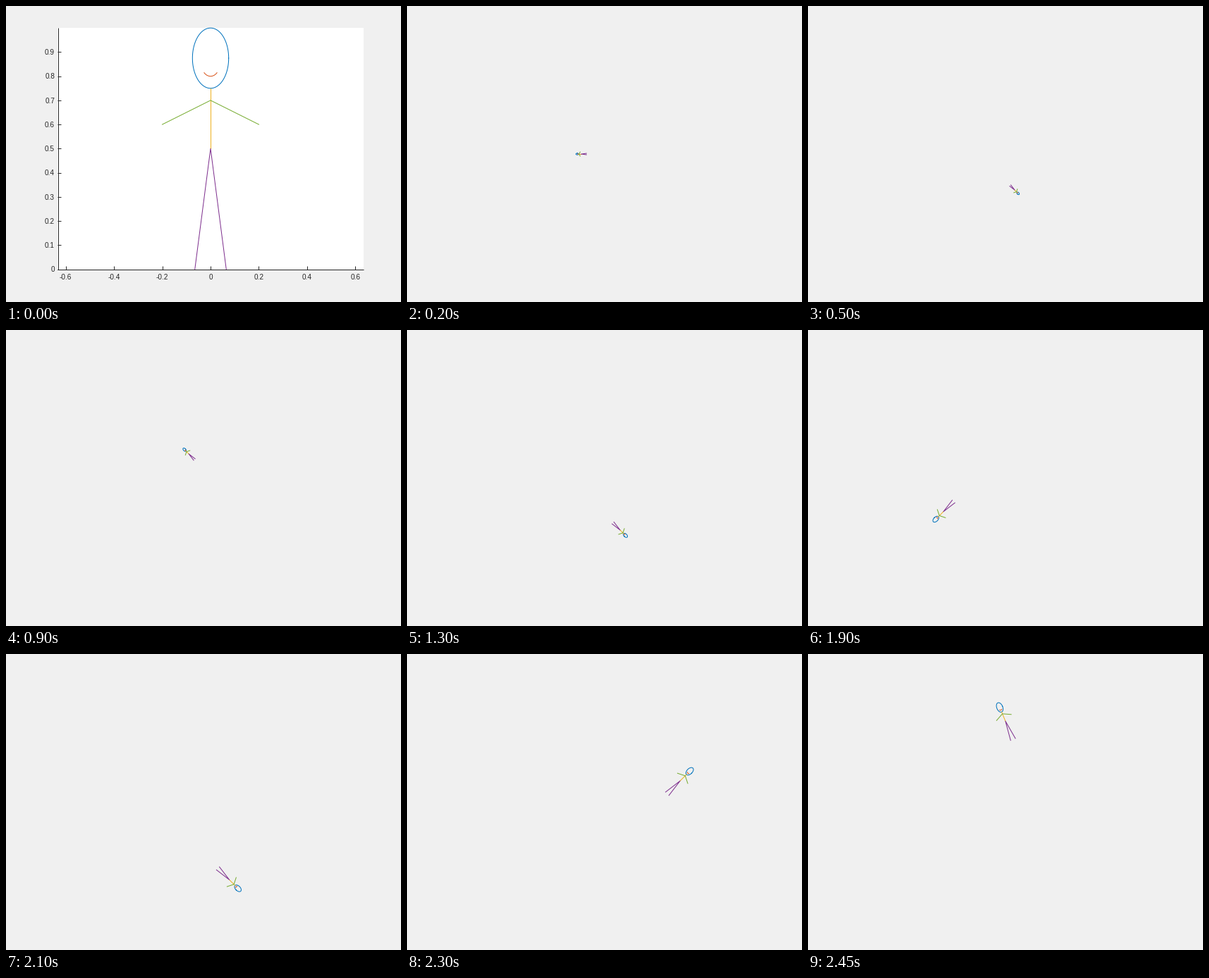
A matplotlib script that plays this animation: 560x420 px, repeating every 2500 ms.

```python
import numpy as np
import matplotlib.pyplot as plt
from matplotlib.animation import FuncAnimation
from matplotlib.patches import Rectangle

W, H, DPI = 560, 420, 100
FRAMES, INTERVAL = 50, 50
PX = 72 / DPI
INK = "#262626"

# Plot box in pixels, y pointing down
LEFT, RIGHT, TOP, BOTTOM = 73, 507, 31, 374
BIG, BIG_ORIGIN = 342.3, (290, 373.5)
SMALL, SMALL_ORIGIN = 13.2, (290, 202.4)

# Each step shifts the figure, then turns and enlarges it
SHIFT = -0.5 + 0.5j
STEP = 1.03 * np.exp(1j * np.pi / 8)


def arc(center, rx, ry, start, end):
    t = np.radians(np.linspace(start, end, 100))
    return rx * np.cos(t) + 1j * (center + ry * np.sin(t))


# Body parts as complex numbers, with the feet on the real axis
PARTS = [
    ("#0072bd", arc(0.875, 0.075, 0.125, 0, 360)),
    ("#d95319", arc(0.85, 0.0375, 0.05, 225, 315)),
    ("#edb120", np.array([0.75j, 0.5j])),
    ("#7e2f8e", np.array([-0.065, 0.5j, 0.065])),
    ("#77ac30", np.array([-0.2 + 0.6j, 0.7j, 0.2 + 0.6j])),
]

fig = plt.figure(figsize=(W / DPI, H / DPI), dpi=DPI, facecolor="#f0f0f0")
ax = fig.add_axes([0, 0, 1, 1])
ax.set_xlim(0, W)
ax.set_ylim(H, 0)
ax.axis("off")

chart = [ax.add_patch(Rectangle((LEFT, TOP), RIGHT - LEFT, BOTTOM - TOP,
                                fc="white", ec="none", zorder=0))]


def rule(x, y):
    chart.extend(ax.plot(x, y, color=INK, lw=PX, zorder=3,
                         solid_capstyle="butt"))


def label(x, y, value, align):
    chart.append(ax.text(x, y, f"{value:.1f}" if value else "0", color=INK,
                         fontsize=10 * PX, family="Liberation Sans",
                         ha=align, va="baseline"))


def build_chart():
    x0, y0 = BIG_ORIGIN
    rule([LEFT, RIGHT], [BOTTOM - 0.5] * 2)
    rule([LEFT + 0.5] * 2, [TOP, BOTTOM])
    for i in range(-3, 4):
        x = x0 + 0.2 * i * BIG
        rule([x, x], [BOTTOM - 5, BOTTOM])
        label(x, 388.2, 0.2 * i, "center")
    for i in range(10):
        y = y0 - 0.1 * i * BIG
        rule([LEFT, LEFT + 5], [y, y])
        label(69, y + 3.7, 0.1 * i, "right")


build_chart()
lines = [ax.plot([], [], color=color, lw=PX, zorder=2)[0]
         for color, _ in PARTS]


def pose(points, k):
    for _ in range(k):
        points = STEP * (points + SHIFT)
    return points


def draw(k):
    first = k == 0
    for item in chart:
        item.set_visible(first)
    scale = BIG if first else SMALL
    x0, y0 = BIG_ORIGIN if first else SMALL_ORIGIN
    for line, (_, points) in zip(lines, PARTS):
        z = pose(points, k)
        line.set_data(x0 + scale * z.real, y0 - scale * z.imag)
    return chart + lines


anim = FuncAnimation(fig, draw, frames=FRAMES, interval=INTERVAL,
                     repeat=True, repeat_delay=0, blit=False)
plt.show()
```
